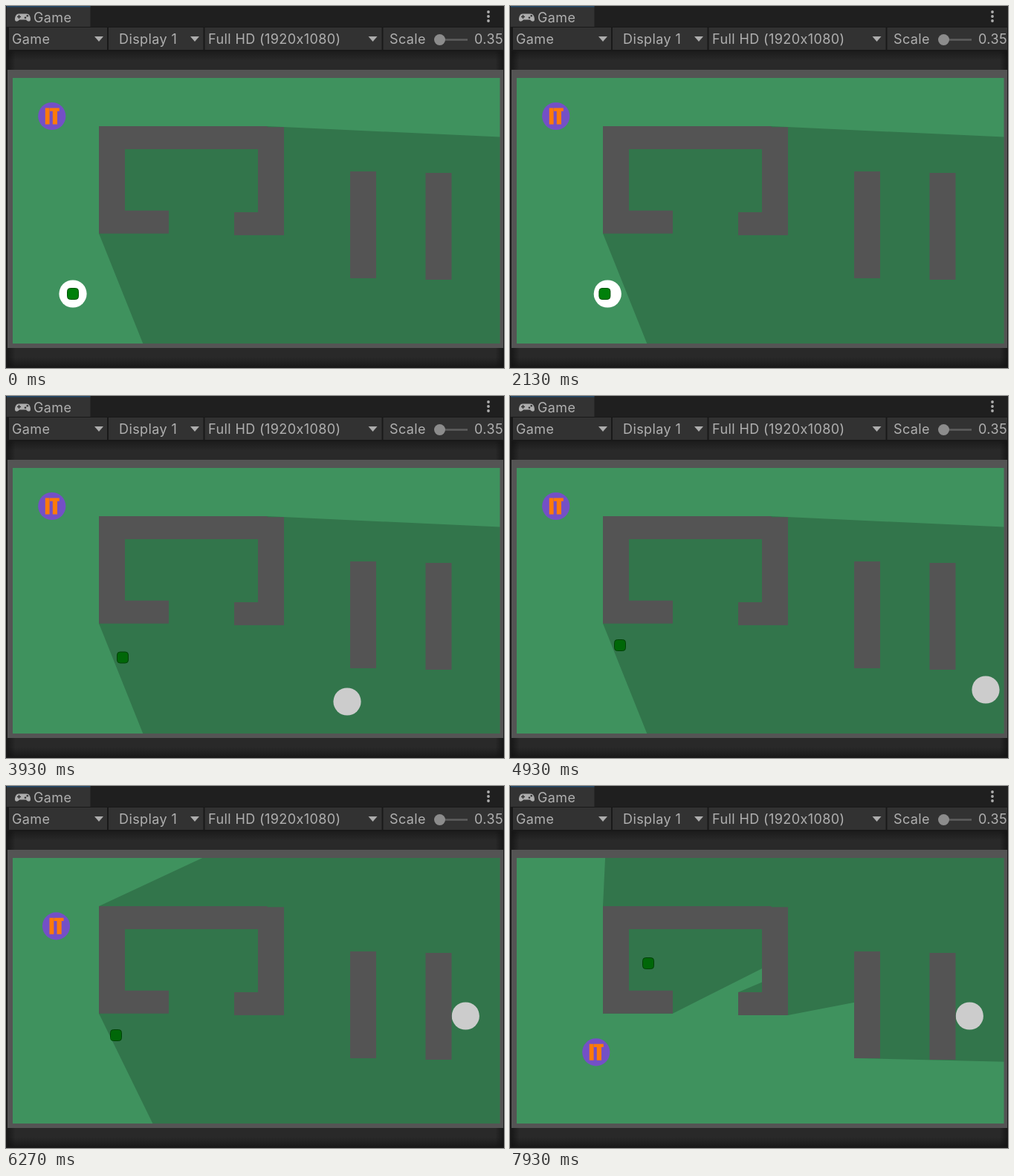
Animation of 670x488 px, one loop 8 s. Source, as an HTML page:

```html
<!DOCTYPE html>
<html lang="en">
<head>
<meta charset="utf-8">
<title>Hide and seek</title>
<style>
  html, body { margin: 0; width: 100%; height: 100%; overflow: hidden; background: #191919; }
  svg { display: block; width: 670px; height: 488px; }
  text { font: 18px Inter, "Open Sans", sans-serif; letter-spacing: .4px; fill: #b0b0b0; }
  .icon { fill: #adadad; }
  .wall { fill: #545454; }
</style>
</head>
<body>
<svg viewBox="0 0 670 488">
  <defs>
    <clipPath id="field"><rect x="9" y="97" width="655.5" height="358"/></clipPath>
    <linearGradient id="band" x2="0" y2="1">
      <stop offset="0" stop-color="#1c1c1c"/>
      <stop offset=".03" stop-color="#292929"/>
      <stop offset=".97" stop-color="#292929"/>
      <stop offset="1" stop-color="#1a1a1a"/>
    </linearGradient>
    <linearGradient id="sides">
      <stop offset="0" stop-color="#111" stop-opacity=".7"/>
      <stop offset=".016" stop-color="#111" stop-opacity="0"/>
      <stop offset=".984" stop-color="#111" stop-opacity="0"/>
      <stop offset="1" stop-color="#111" stop-opacity=".7"/>
    </linearGradient>
    <path id="arrow" class="icon" d="M-6-4H6L0 3Z"/>
  </defs>

  <!-- window bars -->
  <rect width="670" height="488" fill="#191919"/>
  <rect width="670" height="28" fill="#1f1f1f"/>
  <rect x="1" width="112.500" height="28" fill="#333"/>
  <rect x="1" width="112.500" height="1.500" fill="#23496b"/>
  <path class="icon" d="M17 10.500H28C31 10.500 33 14 33 18C33 21.500 29.500 21.500 27 18.500H18C15.500 21.500 12 21.500 12 18C12 14 14 10.500 17 10.500Z"/>
  <path d="M15 14.500h5M17.500 12v5" stroke="#333" stroke-width="1.500"/>
  <circle cx="26" cy="15.800" r="1.300" fill="#333"/>
  <circle cx="28.800" cy="13.200" r="1.300" fill="#333"/>
  <text x="37" y="22">Game</text>
  <path d="M649 8v12.100" stroke="#adadad" stroke-width="3.800" stroke-linecap="round" stroke-dasharray="0 6"/>
  <path d="M4 29H136V59H4ZM138 29H265.500V59H138ZM267.500 29H505.500V59H267.500ZM507.500 29H669V59H507.500Z" fill="#323232"/>
  <use href="#arrow" x="125" y="45"/>
  <use href="#arrow" x="254" y="45"/>
  <use href="#arrow" x="493.500" y="45"/>
  <text x="8" y="51">Game</text>
  <text x="152" y="51">Display 1</text>
  <text x="272" y="51">Full HD (1920x1080)</text>
  <text x="516" y="51">Scale</text>
  <path d="M590 45.500H621" stroke="#5e5e5e" stroke-width="2.500"/>
  <circle cx="583.500" cy="45.500" r="7.500" fill="#8c8c8c"/>
  <text x="630" y="51">0.35</text>
  <rect x="669" y="28" width="1" height="32" fill="#191919"/>

  <!-- game view -->
  <rect x="2" y="61" width="667" height="425" fill="url(#band)"/>
  <rect x="2" y="61" width="667" height="425" fill="url(#sides)"/>
  <rect class="wall" x="2" y="86" width="667" height="375"/>
  <g clip-path="url(#field)">
    <rect x="9" y="97" width="656" height="358" fill="#3f925e"/>
    <circle id="player" r="18.600" fill="#fff"/>
    <rect id="hider" x="-7.500" y="-7.500" width="15" height="15" rx="4" fill="#00800a" stroke="#00520a"/>
    <path id="shadow" opacity=".2"/>
    <g id="seeker">
      <circle r="18.600" fill="#7450c6"/>
      <path aria-label="IT" fill="#ff7a0a" d="M-9-11H-3.200V11H-9ZM-2.800-11H10V-6.800H7.200V11H1V-6.800H-2.800Z"/>
    </g>
  </g>
  <path id="walls" class="wall"/>
</svg>

<script>
const LOOP = 8000;
const FAR = 60;
const $ = id => document.getElementById(id);

// left, top, width, height
const walls = [
  [125, 162, 35, 144.7],
  [125, 162, 226.5, 31],
  [339, 163.2, 35, 145.8],
  [125, 275.7, 94, 31],
  [307, 278, 67, 31],
  [463, 223, 35, 144],
  [564.5, 225, 35, 144]
].map(([x, y, w, h]) => [[x, y], [x + w, y], [x + w, y + h], [x, y + h]]);

// Each walk leaves at a time (ms) and keeps one speed (px/ms) through its stops.
const actors = {
  player: {
    home: [90, 388],
    walks: [{ start: 1911, speed: .1876, stops: [[393, 388], [417, 412], [624, 412], [642.5, 393.5], [642.5, 334], [618.3, 310]] }]
  },
  hider: {
    home: [90, 388],
    walks: [
      { start: 1911, speed: .17, stops: [[169, 388]] },
      { start: 2730, speed: .05, stops: [[157, 352.5]] },
      { start: 3960, speed: .05, stops: [[148, 336]] },
      { start: 6480, speed: .06, stops: [[185, 337]] },
      { start: 7130, speed: .195, stops: [[232, 322], [238, 285], [186, 239]] }
    ]
  },
  seeker: {
    home: [61.8, 148.5],
    walks: [
      { start: 5990, speed: .145, stops: [[67.5, 188.7], [70.5, 283.4]] },
      { start: 7330, speed: .15, stops: [[87, 330], [116, 359]] }
    ]
  }
};

function locate({ home, walks }, time) {
  let pos = home;
  for (const { start, speed, stops } of walks) {
    let left = Math.max(0, time - start) * speed;
    for (const [x, y] of stops) {
      const dx = x - pos[0], dy = y - pos[1];
      const length = Math.hypot(dx, dy);
      const k = Math.min(1, left / length);
      pos = [pos[0] + dx * k, pos[1] + dy * k];
      if (k < 1) return pos;
      left -= length;
    }
  }
  return pos;
}

const polygon = points => "M" + points.join("L") + "Z";

// Extrude every wall edge that faces the light.
function castShadow([lx, ly]) {
  const away = ([x, y]) => [x + (x - lx) * FAR, y + (y - ly) * FAR];
  let d = "";
  for (const wall of walls) {
    wall.forEach((p, i) => {
      const q = wall[(i + 1) % 4];
      const side = (q[0] - p[0]) * (ly - p[1]) - (q[1] - p[1]) * (lx - p[0]);
      if (side < 0) d += polygon([p, q, away(q), away(p)]);
    });
  }
  return d;
}

$("walls").setAttribute("d", walls.map(polygon).join(""));

function draw() {
  const time = performance.now() % LOOP;
  for (const id in actors) {
    $(id).setAttribute("transform", `translate(${locate(actors[id], time)})`);
  }
  $("shadow").setAttribute("d", castShadow(locate(actors.seeker, time)));
  requestAnimationFrame(draw);
}
draw();
</script>
</body>
</html>
```
